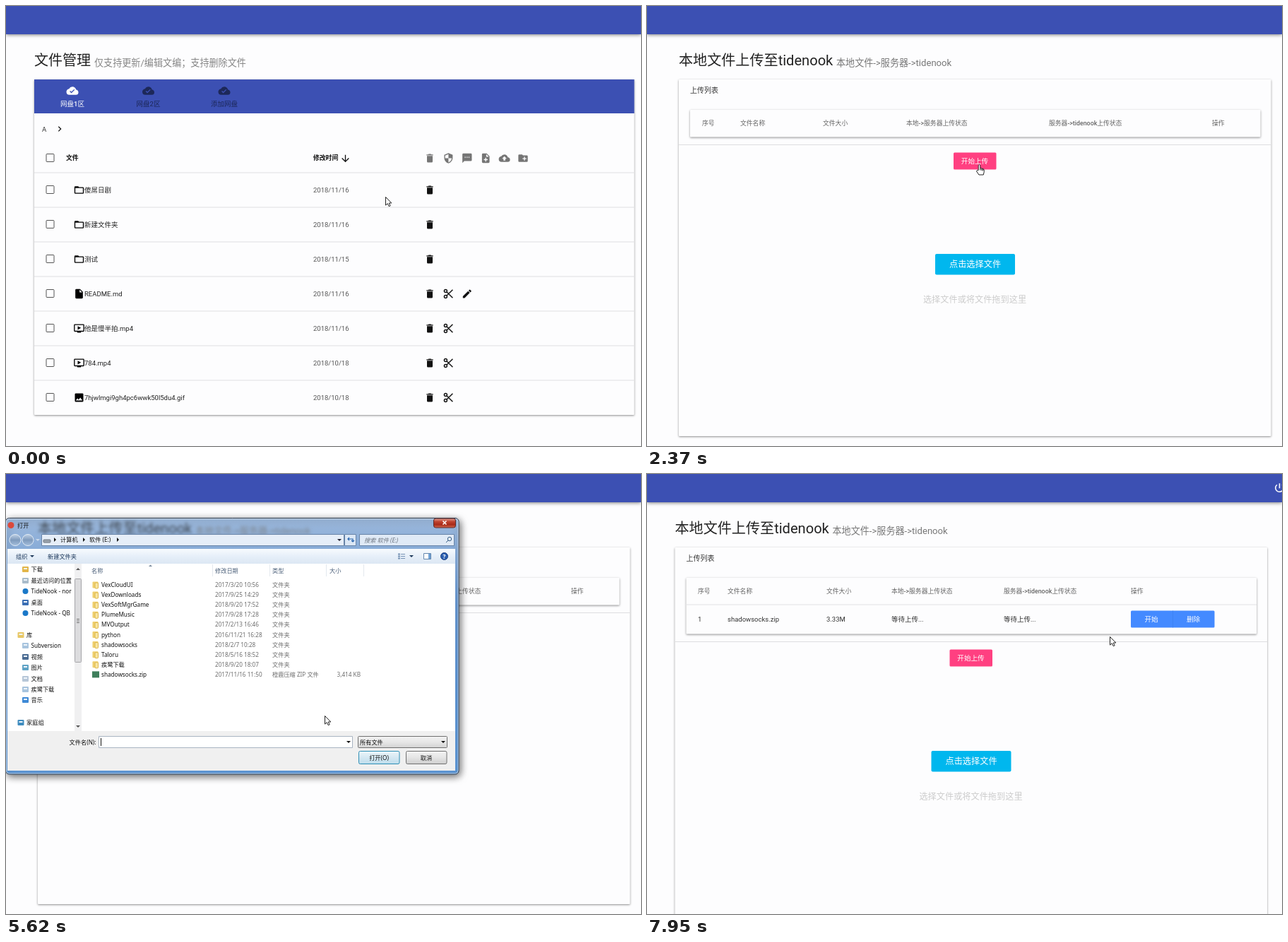
Write an HTML page with a canvas that moves like this. It is 899x623 px and loops after 8000 ms.

```html
<!DOCTYPE html>
<html lang="zh-CN">
<head>
<meta charset="utf-8">
<style>
html, body { margin: 0; width: 100%; height: 100%; overflow: hidden; background: #fdfdfe; }
canvas { position: absolute; left: 0; top: 0; }
#dialog { transform-origin: 320px 243.5px; }
</style>
</head>
<body>
<canvas id="page" width="899" height="623"></canvas>
<canvas id="dialog" width="899" height="623"></canvas>
<canvas id="pointer" width="899" height="623"></canvas>
<script>
const LOOP = 8000, BLUE = '#3c50b3', BG = '#fdfdfe';
const WEB = 'Roboto, "Noto Sans CJK SC", sans-serif';
const SYSTEM = '"Noto Sans", "Noto Sans CJK SC", sans-serif';
const [page, dialog, pointer] = ['page', 'dialog', 'pointer']
  .map(id => document.getElementById(id).getContext('2d'));
let c = page, family = WEB;

const CLOUD = 'M19.35 10C18.7 6.6 15.6 4 12 4Q7.5 4 5.35 8C2.3 8.4 0 11 0 14Q0 20 6 20H19Q24 20 24 15C24 12.4 22 10.2 19.35 10z';
const FOLDER = 'M4 4H10L12 6H20Q22 6 22 8V18Q22 20 20 20H4Q2 20 2 18V6Q2 4 4 4z';
const SHEET = 'M6 2H14L20 8V20Q20 22 18 22H6Q4 22 4 20V4Q4 2 6 2zM13 3.5V9H18.5z';
const ICONS = {
  trash: 'M6 7H18V19Q18 21 16 21H8Q6 21 6 19zM5 4H8.5L9.5 3H14.5L15.5 4H19V6H5z',
  shield: 'M12 1L21 5V11C21 16.5 17.2 21.7 12 23C6.8 21.7 3 16.5 3 11V5zM12 3.2L5 6.3V12H12V21C15.7 19.8 18.5 16 19 12H12z',
  chat: 'M4 2H20Q22 2 22 4V16Q22 18 20 18H6L2 22V4Q2 2 4 2zM7 9V11H9V9zM11 9V11H13V9zM15 9V11H17V9z',
  addFile: SHEET + 'M11 11H13V14H16V16H13V19H11V16H8V14H11z',
  upload: CLOUD + 'M10 17V13H7L12 8L17 13H14V17z',
  addFolder: FOLDER + 'M14 9H16V12H19V14H16V17H14V14H11V12H14z',
  cloud: CLOUD + 'M10 17L6.5 13.5L7.9 12L10 14.2L15.2 9L16.6 10.4z',
  folder: FOLDER + 'M4 8V18H20V8z',
  file: SHEET,
  video: 'M3 3H21Q23 3 23 5V17Q23 19 21 19H16V21H8V19H3Q1 19 1 17V5Q1 3 3 3zM3 5V17H21V5zM9 7L16 11L9 15z',
  image: 'M5 3H19Q21 3 21 5V19Q21 21 19 21H5Q3 21 3 19V5Q3 3 5 3zM8.5 13.5L5 18H19L14.5 12L11 16.5z',
  pencil: 'M3 17.2V21H6.8L17.8 9.9L14 6.2zM20.7 7Q21.4 6.3 20.7 5.6L18.4 3.3Q17.7 2.6 17 3.3L15.1 5.1L18.9 8.9z',
  chevron: 'M10 6L8.6 7.4L13.2 12L8.6 16.6L10 18L16 12z',
  down: 'M20 12L18.6 10.6L13 16.2V4H11V16.2L5.4 10.6L4 12L12 20z'
};
const LINES = {
  cut: 'M9 6A3 3 0 1 0 3 6A3 3 0 1 0 9 6M9 18A3 3 0 1 0 3 18A3 3 0 1 0 9 18M8 8L21 20.5M8 16L21 3.5',
  power: 'M12 3V13M17 6A8 8 0 1 1 7 6'
};
const ARROW = new Path2D('M0 0V11.6L2.8 9.2L4.7 13.2L6.6 12.4L4.8 8.5H8.3z');
const HAND = new Path2D('M-1.3 8V1Q0 -.8 1.3 1V5L5.8 6.2Q7.2 7 6.8 10L5.8 14.5H-.6L-4 9.5Q-3.6 7.6 -1.3 8z');

const clamp = v => Math.max(0, Math.min(1, v));

function text(s, x, y, size, color, align = 'left', style = '') {
  c.font = `${style} ${size}px ${family}`;
  c.fillStyle = color;
  c.textAlign = align;
  c.fillText(s, x, y + size * .37);
}
function box(x, y, w, h, fill, stroke, r = 0) {
  c.beginPath();
  c.roundRect(x, y, w, h, r);
  if (fill) { c.fillStyle = fill; c.fill(); }
  if (stroke) { c.strokeStyle = stroke; c.lineWidth = 1; c.stroke(); }
}
function disc(x, y, r, fill, stroke) { box(x - r, y - r, 2 * r, 2 * r, fill, stroke, r); }
function raised(x, y, w, h, fill = BG, r = 1) {
  c.save();
  c.shadowColor = 'rgba(0,0,0,.45)'; c.shadowBlur = 3; c.shadowOffsetY = 1;
  box(x, y, w, h, fill, null, r);
  c.restore();
}
function icon(name, x, y, color, size = 16) {
  c.save();
  c.translate(x - size / 2, y - size / 2);
  c.scale(size / 24, size / 24);
  c.fillStyle = c.strokeStyle = color;
  c.lineWidth = 2.2;
  if (LINES[name]) c.stroke(new Path2D(LINES[name]));
  else c.fill(new Path2D(ICONS[name]), 'evenodd');
  c.restore();
}
function gradient(y0, y1, ...colors) {
  const g = c.createLinearGradient(0, y0, 0, y1);
  colors.forEach((color, i) => g.addColorStop(i / (colors.length - 1), color));
  return g;
}
function triangle(x, y, color, sideways) {
  c.fillStyle = color;
  c.fill(new Path2D(sideways ? `M${x - 1} ${y - 3}v6l3 -3z` : `M${x - 3} ${y - 1}h6l-3 3z`));
}

function topBar() {
  c.save();
  c.shadowColor = 'rgba(0,0,0,.5)'; c.shadowBlur = 5; c.shadowOffsetY = 1;
  box(0, -5, 899, 45, BLUE);
  c.restore();
}

const FILES = [
  ['folder', '傻屌日剧', '2018/11/16'], ['folder', '新建文件夹', '2018/11/16'],
  ['folder', '测试', '2018/11/15'], ['file', 'README.md', '2018/11/16'],
  ['video', '他是慢半拍.mp4', '2018/11/16'], ['video', '784.mp4', '2018/10/18'],
  ['image', '7hjwlmgi9gh4pc6wwk50l5du4.gif', '2018/10/18']
];

function filesPage(t) {
  topBar();
  text('文件管理', 40, 77, 20, '#222');
  text('仅支持更新/编辑文编；支持删除文件', 125, 80, 13.1, '#858585');
  raised(40, 104, 849.5, 475);
  box(40, 104, 849.5, 48, BLUE);
  ['网盘1区', '网盘2区', '添加网盘'].forEach((label, i) => {
    const color = i ? '#1d2859' : '#fff', x = 94 + i * 107.5;
    icon('cloud', x, 120, color, 17);
    text(label, x, 138.5, 9.5, color, 'center', i ? '' : '500');
  });
  text('A', 51, 174, 9.5, '#333');
  icon('chevron', 76, 174, '#111', 15);

  const check = y => box(57, y - 5.5, 11, 11, null, '#555', 1);
  check(215);
  text('文件', 85, 215, 8.8, '#111', 'left', 'bold');
  text('修改时间', 435, 215, 8.8, '#111', 'left', 'bold');
  icon('down', 480.5, 216, '#111');
  c.globalAlpha = clamp((t - 830) / 150);
  disc(705.5, 215.5, 12, '#dedede');
  c.globalAlpha = 1;
  ['trash', 'shield', 'chat', 'addFile', 'upload', 'addFolder']
    .forEach((name, i) => icon(name, 600 + i * 26.4, 215.5, '#757575'));

  FILES.forEach(([kind, name, date], i) => {
    const y = 260 + i * 49;
    box(40, y - 24.5, 849.5, 1, '#e0e0e3');
    check(y);
    icon(kind, 103.5, y + .5, '#000');
    text(name, 111, y, 9.5, '#222');
    text(date, 435, y, 9.5, '#555');
    ['trash', i > 2 && 'cut', i === 3 && 'pencil']
      .forEach((action, k) => action && icon(action, 600 + k * 26.4, y + .5, '#111'));
  });

  const tip = clamp((t - 910) / 170);
  if (tip) {
    c.save();
    c.translate(705.5, 245.5);
    c.scale(tip, tip);
    c.globalAlpha = tip;
    box(-49, -8.5, 98, 17, '#6c6c6c', null, 1.5);
    text('本地上传文件至tidenook', 0, 0, 8.1, '#fff', 'center', 'bold');
    c.restore();
  }
}

function uploadTitle() {
  text('本地文件上传至tidenook', 45, 77, 20.1, '#222');
  text('本地文件->服务器->tidenook', 268, 80, 13.1, '#777');
}

function uploadPage(t) {
  const filled = t >= 7400, dy = filled ? 41 : 0;
  topBar();
  if (filled) icon('power', 895.5, 19.5, '#fff', 17);
  c.save();
  if (filled) c.translate(-5.5, 0);
  uploadTitle();
  raised(45, 104, 838.5, 505 + dy);
  text('上传列表', 61, 119, 10, '#333');
  raised(61, 147, 807.5, 38.5 + dy);
  const columns = filled ? [77.5, 119.5, 259.5, 351.5, 510.5, 690.5] : [78, 132, 249, 367, 569, 800];
  ['序号', '文件名称', '文件大小', '本地->服务器上传状态', '服务器->tidenook上传状态', '操作']
    .forEach((label, i) => text(label, columns[i], 165.5, 8.8, '#666', 'left', '500'));
  if (filled) {
    box(61, 184.5, 807.5, 1, '#e2e2e5');
    ['1', 'shadowsocks.zip', '3.33M', '等待上传...', '等待上传...']
      .forEach((value, i) => text(value, columns[i], 205, 9.5, '#333'));
    box(690.5, 193.5, 118.5, 24, '#448aff', null, 1.5);
    box(749.5, 193.5, .7, 24, '#3c7ef0');
    text('开始', 719.5, 205.5, 9.6, '#fff', 'center', '500');
    text('删除', 779, 205.5, 9.6, '#fff', 'center', '500');
  }
  c.translate(0, dy);
  box(45, 196, 838.5, 1, '#dedee0');

  box(434, 207.5, 60.5, 24, '#ff4081', null, 1.5);
  if (t > 3200 && !filled) {
    const grow = clamp((t - 3200) / 450);
    c.save();
    c.clip();
    disc(471, 223, 45 * grow, 'rgba(255,255,255,.16)');
    c.restore();
  }
  text('开始上传', 464, 219.5, 9.6, '#fff', 'center', '500');

  const picker = t >= 1580;
  if (picker) {
    box(408, 351, 113, 29.5, t > 4600 && !filled ? '#00a2d4' : '#00b7ee', null, 2);
    text('点击选择文件', 464.5, 365.5, 12.2, '#fff', 'center');
  }
  text('选择文件或将文件拖到这里', 464, picker ? 415 : 369.5, 12.2, '#ccc', 'center');
  c.restore();
}

const PLACES = [
  ['下载', 135, '#e3b64a'], ['最近访问的位置', 151, '#a9bccb'], ['TideNook - nor', 166, '#1a78c8', 1],
  ['桌面', 182, '#3c6fb4'], ['TideNook - QB', 197, '#1a78c8', 1], ['库', 228, '#e8c765'],
  ['Subversion', 243, '#a8c4de'], ['视频', 259, '#4b6c93'], ['图片', 274, '#5fa3c5'],
  ['文档', 290, '#b7c7d8'], ['疾鹭下载', 305, '#a8c4de'], ['音乐', 320, '#3f8ad6'], ['家庭组', 352, '#3f8cbf']
];
const ENTRIES = [
  ['VexCloudUI', '2017/3/20 10:56'], ['VexDownloads', '2017/9/25 14:29'],
  ['VexSoftMgrGame', '2018/9/20 17:52'], ['PlumeMusic', '2017/9/28 17:28'],
  ['MVOutput', '2017/2/13 16:46'], ['python', '2016/11/21 16:28'],
  ['shadowsocks', '2018/2/7 10:28'], ['Taloru', '2018/5/16 18:52'],
  ['疾鹭下载', '2018/9/20 18:07'], ['shadowsocks.zip', '2017/11/16 11:50']
];

function drawDialog(selected) {
  const label = (s, x, y, color = '#111', align, style) => text(s, x, y, 8.2, color, align, style);
  c.save();
  c.shadowColor = 'rgba(0,0,0,.6)'; c.shadowBlur = 11; c.shadowOffsetX = 2; c.shadowOffsetY = 3;
  box(-.5, 62.5, 641.5, 362.5, gradient(62, 425, '#9db9dc', '#6394cf', '#5a92d2', '#5d97d6'), '#26374d', 5);
  c.restore();

  // Glass title bar with the page showing through
  c.save();
  c.filter = 'blur(2px)';
  c.globalAlpha = .75;
  family = WEB;
  uploadTitle();
  family = SYSTEM;
  c.restore();
  box(.5, 63.5, 639.5, 360.5, null, 'rgba(255,255,255,.55)', 4);
  disc(7, 72.5, 4.5, '#db4a3c');
  label('打开', 16, 72.5);
  box(605.5, 63, 31, 13, gradient(63, 76, '#e2a196', '#c04430', '#a82a18', '#d2694f'), '#5c2a2a', 3);
  c.strokeStyle = '#fff'; c.lineWidth = 1.6;
  c.stroke(new Path2D('M618.5 66.5l5 5M623.5 66.5l-5 5'));

  // Navigation row
  for (const x of [13, 31]) disc(x, 93.5, 8, gradient(85, 102, '#c3d3e6', '#7f9bbd', '#a5bfdd'), '#e0eaf5');
  triangle(45, 93, '#c9d8ea');
  box(50.5, 85.5, 428, 16, '#e6eef8', '#6884a8');
  box(479.5, 85.5, 16, 16, '#dbe7f5', '#6884a8');
  box(500.5, 85.5, 134, 16, '#e0eaf6', '#6884a8');
  box(53, 93, 10, 4, '#9aa3ad', '#6c757e', 1);
  label('计算机', 77, 93);
  label('软件 (E:)', 118, 93);
  for (const x of [69, 110, 158]) triangle(x, 93, '#111', true);
  triangle(472, 93, '#223');
  c.strokeStyle = '#2a66b0'; c.lineWidth = 1.2;
  c.stroke(new Path2D('M484 92h7v4M486 90l-2 2 2 2M489 94l2 2 2-2'));
  label('搜索 软件 (E:)', 507, 93.5, '#6b7480', 'left', 'italic');
  disc(628, 92, 2.7, null, '#3c6288');
  c.stroke(new Path2D('M626 94l-3 3'));

  // Toolbar
  box(2, 106, 634, 21, gradient(106, 127, '#f8fbfe', '#e6eff9', '#dce7f3'));
  label('组织', 14, 116.5, '#1e395b');
  triangle(37, 116, '#1e395b');
  label('新建文件夹', 59, 116.5, '#1e395b');
  for (let i = 0; i < 3; i++) {
    box(555, 112.5 + i * 3, 3, 2, '#7793b4');
    box(559, 113 + i * 3, 6, 1, '#7793b4');
  }
  triangle(574, 116, '#1e395b');
  box(591.5, 112.5, 10, 8, '#fff', '#6487ae');
  box(598, 113, 3, 7, '#6da0d4');
  disc(620.5, 116.5, 5, '#2b5fb0', '#1c3f80');
  label('?', 620.5, 116.5, '#fff', 'center', 'bold');

  // Places
  box(2, 127, 634, 237, '#fff');
  c.save();
  c.beginPath(); c.rect(2, 127, 95, 237); c.clip();
  for (const [name, y, color, brand] of PLACES) {
    const x = name === '库' || name === '家庭组' ? 21 : 27.5;
    if (brand) disc(x, y, 4, color);
    else { box(x - 4.5, y - 4, 9, 8, color, null, 1); box(x - 2.5, y - 2, 5, 2, '#eef4fa'); }
    label(name, x + 8, y);
  }
  c.restore();
  box(97, 127, 10, 237, '#f0f0f1');
  box(97.5, 148.5, 9, 118, '#dcdcde', '#a5a5a8', 1);
  for (const y of [205, 207.5, 210]) box(100, y, 4, 1, '#777');
  triangle(102, 357, '#555');
  c.fillStyle = '#555';
  c.fill(new Path2D('M99 136h6l-3-3z'));

  // File list
  [['名称', 121], ['修改日期', 296], ['类型', 377], ['大小', 458]].forEach(([s, x]) => label(s, x, 137, '#4c607a'));
  for (const x of [292, 373, 453, 506]) box(x, 128, 1, 17, '#e3e8ee');
  c.fillStyle = '#77889c';
  c.fill(new Path2D('M202 131h5l-2.5-2.5z'));
  if (selected) box(119.5, 277, 385, 14, gradient(277, 291, '#dcebfc', '#c1dbfc'), '#7da2ce', 2);
  ENTRIES.forEach(([name, date], i) => {
    const y = 157 + i * 14.1, zip = i === 9;
    if (zip) box(122, y - 4.5, 10, 9, '#3f7f5c');
    else {
      box(122.5, y - 4.5, 8, 9, '#efcf6c', null, 1);
      box(126, y - 3, 4.5, 8, '#f8e6a2', '#dcb54c', 1);
    }
    label(name, 135, y);
    label(date, 296, y, '#6d6d6d');
    label(zip ? '橙鹿压缩 ZIP 文件' : '文件夹', 377, y, '#6d6d6d');
    if (zip) label('3,414 KB', 502, y, '#6d6d6d', 'right');
  });

  // Footer
  box(2, 364, 634, 56, '#f0f0f0');
  label('文件名(N):', 127.5, 379.5, '#111', 'right');
  box(131.5, 371.5, 359, 16, '#fff', '#a9b4c2');
  if (selected) label('shadowsocks.zip', 134, 380);
  else box(134, 374, 1, 11, '#111');
  triangle(485, 379, '#111');
  const grey = y => gradient(y, y + 18, '#f4f4f4', '#e6e6e6', '#d0d0d0');
  box(498.5, 371.5, 126, 16, grey(371), '#707070', 1);
  label('所有文件', 501, 379.5);
  triangle(619, 379, '#111');
  box(499.5, 392.5, 57.5, 18, gradient(392, 411, '#eef7fb', '#d5e8f2', '#bcdcec'), '#2f8fb5', 2);
  box(566.5, 392.5, 57.5, 18, grey(392), '#707070', 2);
  label('打开(O)', 528, 401.5, '#111', 'center');
  label('取消', 595, 401.5, '#111', 'center');
}

const ROUTE = [
  [80, 537, 270], [870, 705, 222], [1500, 705, 222], [2290, 470, 224], [3200, 470, 224],
  [3700, 472, 222], [4040, 472, 222], [4790, 455, 356], [5040, 455, 356], [5380, 451, 342],
  [5870, 451, 342], [6500, 187, 278], [6750, 187, 278], [7150, 528, 398], [7580, 528, 398], [7950, 655, 230]
];

function drawPointer(t) {
  const next = ROUTE.findIndex(stop => stop[0] > t);
  const to = ROUTE[next < 0 ? ROUTE.length - 1 : next], from = ROUTE[Math.max(0, next - 1)];
  const k = next < 1 ? 1 : (t - from[0]) / (to[0] - from[0]), ease = k * k * (3 - 2 * k);
  const x = from[1] + (to[1] - from[1]) * ease, y = from[2] + (to[2] - from[2]) * ease;
  const inside = (left, top, w, h) => x > left && x < left + w && y > top && y < top + h;
  const hand = t > 1580 && t < 5200 && (inside(434, 207, 60, 24) || inside(408, 351, 113, 29));
  const shape = hand ? HAND : ARROW;
  c.save();
  c.translate(x + .5, y + .5);
  c.fillStyle = '#fff'; c.strokeStyle = '#222'; c.lineWidth = 1;
  c.fill(shape);
  c.stroke(shape);
  if (hand) c.stroke(new Path2D('M1.3 5V8M3.2 6V8.5M5 6.5V9'));
  c.restore();
}

function layer(target, font, draw) {
  c = target;
  family = font;
  c.clearRect(0, 0, 899, 623);
  draw();
}

function frame(now) {
  const t = now % LOOP;
  layer(page, WEB, () => {
    if (t < 1330) filesPage(t);
    else if (t >= 1500) uploadPage(t);
  });
  const open = clamp(Math.min(t - 5370, 7450 - t) / 200), rest = 1 - open;
  const style = dialog.canvas.style;
  style.opacity = open;
  style.transform = rest ? `translateY(${-5 * rest}px) perspective(720px) rotateX(${-8.2 * rest}deg) scale(${1 - .094 * rest})` : 'none';
  if (open) layer(dialog, SYSTEM, () => drawDialog(t >= 6500));
  layer(pointer, WEB, () => drawPointer(t));
  requestAnimationFrame(frame);
}
requestAnimationFrame(frame);
</script>
</body>
</html>
```
